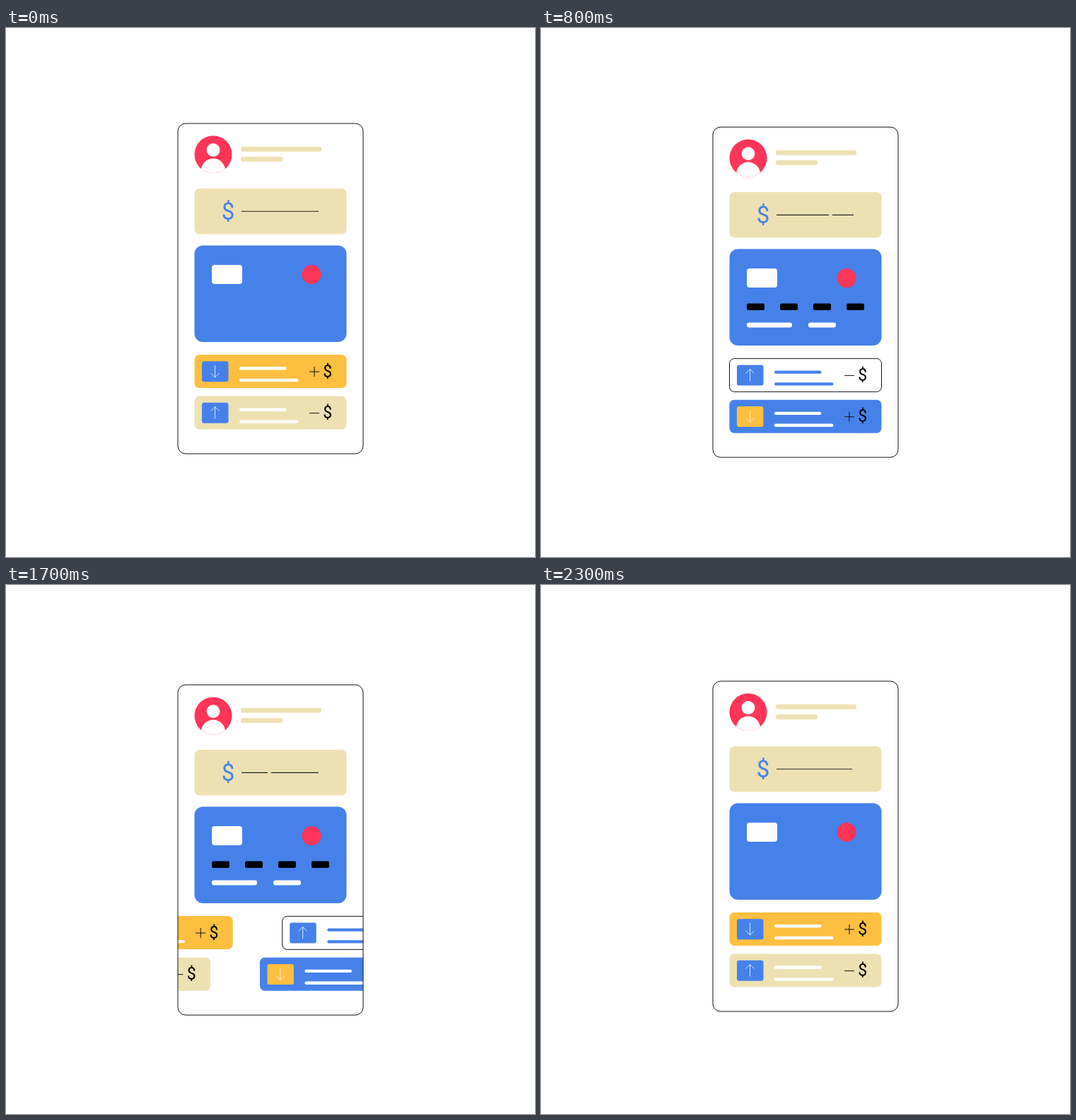
These frames come from a looping animation (748x748 px, 2.4 s). An HTML page:

```html
<!DOCTYPE html>
<html lang="en">
<head>
<meta charset="utf-8">
<title>Wallet screen</title>
<style>
  html, body { margin: 0; width: 100%; height: 100%; overflow: hidden; background: #fff; }
  svg { display: block; width: 100vw; height: 100vh; }
  text { font-family: Roboto, Arial, sans-serif; text-anchor: middle; }
</style>
</head>
<body>
<svg id="stage" viewBox="0 0 748 748">
  <defs>
    <clipPath id="screen"><rect x="243" y="135" width="262" height="467" rx="11"/></clipPath>
    <clipPath id="face"><circle cx="293" cy="178.8" r="26.5"/></clipPath>
  </defs>
  <g id="phone">
    <g id="rows" clip-path="url(#screen)"></g>
    <rect x="243" y="135" width="262" height="467" rx="11" fill="none" stroke="#111"/>

    <circle cx="293" cy="178.8" r="26.5" fill="#ff3558"/>
    <circle cx="293" cy="172.5" r="9.4" fill="#fff"/>
    <circle cx="293" cy="201.5" r="17" fill="#fff" clip-path="url(#face)"/>
    <g fill="#ede1b3">
      <rect x="332" y="167.7" width="114" height="7" rx="3"/>
      <rect x="332" y="182" width="59" height="7" rx="3"/>
      <rect x="266.5" y="227" width="215" height="64.5" rx="7"/>
    </g>
    <text x="314" y="271" font-size="33" fill="#4681ea">$</text>
    <path id="amount" stroke="#222" stroke-width="1.1"/>

    <rect x="266.5" y="307.5" width="215" height="136.5" rx="12" fill="#4681ea"/>
    <rect x="291" y="335" width="43" height="27" rx="4" fill="#fff"/>
    <circle cx="432" cy="348.5" r="13.5" fill="#ff3558"/>
    <g id="details"></g>
  </g>
</svg>
<script>
const LOOP = 2400, STEP = 100;
const BLUE = '#4681ea', AMBER = '#fdbf40', BEIGE = '#ede1b3', WHITE = '#fff', INK = '#111';
const $ = id => document.getElementById(id);

function add(parent, tag, attrs) {
  const node = document.createElementNS('http://www.w3.org/2000/svg', tag);
  for (const key in attrs) node.setAttribute(key, attrs[key]);
  return parent.appendChild(node);
}

// Linear interpolation through [time, value] points, held at both ends.
function lerp(points, t) {
  if (t <= points[0][0]) return points[0][1];
  for (let i = 1; i < points.length; i++) {
    const [t0, v0] = points[i - 1], [t1, v1] = points[i];
    if (t <= t1) return v0 + (v1 - v0) * (t - t0) / (t1 - t0);
  }
  return points[points.length - 1][1];
}

function easeInOut(x) {
  x = Math.min(1, Math.max(0, x));
  return x < 0.5 ? 4 * x ** 3 : 1 - 4 * (1 - x) ** 3;
}

const FLOAT = [[0, 0], [200, 0.1], [400, 1], [600, 3], [800, 5.1], [1000, 7], [1100, 7.6],
  [1250, 8.1], [1400, 8], [1600, 6.9], [1900, 4.5], [2100, 2.7], [2300, 1], [2400, 0]];
const GROW = [[200, 0], [267, 0.24], [333, 0.68], [400, 0.89], [467, 1]];

// Transaction row: income has a down arrow and a plus, spending an up arrow and a minus.
function makeRow(y, income, fill, icon, bars, stroke = 'none') {
  const g = add($('rows'), 'g', {});
  const box = add(g, 'g', { transform: `translate(0 ${y})` });
  add(box, 'rect', { x: 266.5, y: 0, width: 215, height: 47, rx: 7, fill, stroke });
  add(box, 'rect', { x: 277, y: 9.2, width: 37.5, height: 29, rx: 3, fill: icon });
  add(box, 'path', {
    d: income ? 'M295.5 15V32M289.5 26L295.5 32L301.5 26' : 'M295.5 32V15M289.5 21L295.5 15L301.5 21',
    fill: 'none', stroke: WHITE, 'stroke-width': 0.8
  });
  add(box, 'rect', { x: 330, y: 17, width: 66.5, height: 4.4, rx: 2, fill: bars });
  add(box, 'rect', { x: 330, y: 33.8, width: 83.5, height: 4.4, rx: 2, fill: bars });
  add(box, 'path', { d: 'M429 24H443' + (income ? 'M436 17V31' : ''), stroke: INK, 'stroke-width': 1 });
  add(box, 'text', { x: 454.8, y: 31.8, 'font-size': 23, fill: '#000' }).textContent = '$';
  return g;
}

const TRAVEL = 285, SLIDE = 670, SECOND = 1250;
const lanes = [
  { start: 130, first: makeRow(462, true, AMBER, BLUE, WHITE), second: makeRow(462.3, false, WHITE, BLUE, BLUE, INK) },
  { start: 160, first: makeRow(520.6, false, BEIGE, BLUE, WHITE), second: makeRow(520.6, true, BLUE, AMBER, WHITE) }
];

function makeBar(x, width, y, height, fill, delay, rx) {
  return { x, width, delay, node: add($('details'), 'rect', { y, height, fill, rx }) };
}
const bars = [0, 1, 2, 3].map(i => makeBar(291 + 47 * i, 25, 384.3, 9.6, '#000', 67 * i, 2));
bars.push(makeBar(291, 64, 411.3, 7, WHITE, 30, 3.2), makeBar(378, 39, 411.3, 7, WHITE, 104, 3.2));

const shift = (node, x) => node.setAttribute('transform', `translate(${x.toFixed(2)} 0)`);

function drawRows(t) {
  for (const { start, first, second } of lanes) {
    const out = easeInOut((t - start) / SLIDE);
    const back = easeInOut((t - SECOND - start) / SLIDE);
    shift(first, TRAVEL * (back > 0 ? back - 1 : out));
    shift(second, TRAVEL * (out - 1 + back));
  }
}

// Bars grow from the left, then shrink towards the right.
function drawBars(t) {
  for (const { x, width, delay, node } of bars) {
    const shown = lerp(GROW, t - delay), kept = lerp(GROW, 2172 - t + delay);
    node.setAttribute('x', x + width * (1 - kept));
    node.setAttribute('width', Math.max(0, width * (shown + kept - 1)));
  }
}

// A small gap runs along the line twice per loop.
function drawAmount(t) {
  const left = 333, right = 442;
  const gap = t < 1250 ? left + 0.12 * (t - 183) : 335 + 0.1167 * (t - 1400);
  const clamp = x => Math.min(right, Math.max(left, x));
  $('amount').setAttribute('d', `M${left} 259.3H${clamp(gap)}M${clamp(gap + 4.7)} 259.3H${right}`);
}

const begin = performance.now();
function frame() {
  const t = Math.floor((performance.now() - begin) % LOOP / STEP) * STEP;
  $('phone').setAttribute('transform', `translate(0 ${lerp(FLOAT, t)})`);
  drawRows(t);
  drawBars(t);
  drawAmount(t);
  requestAnimationFrame(frame);
}
frame();
</script>
</body>
</html>
```
